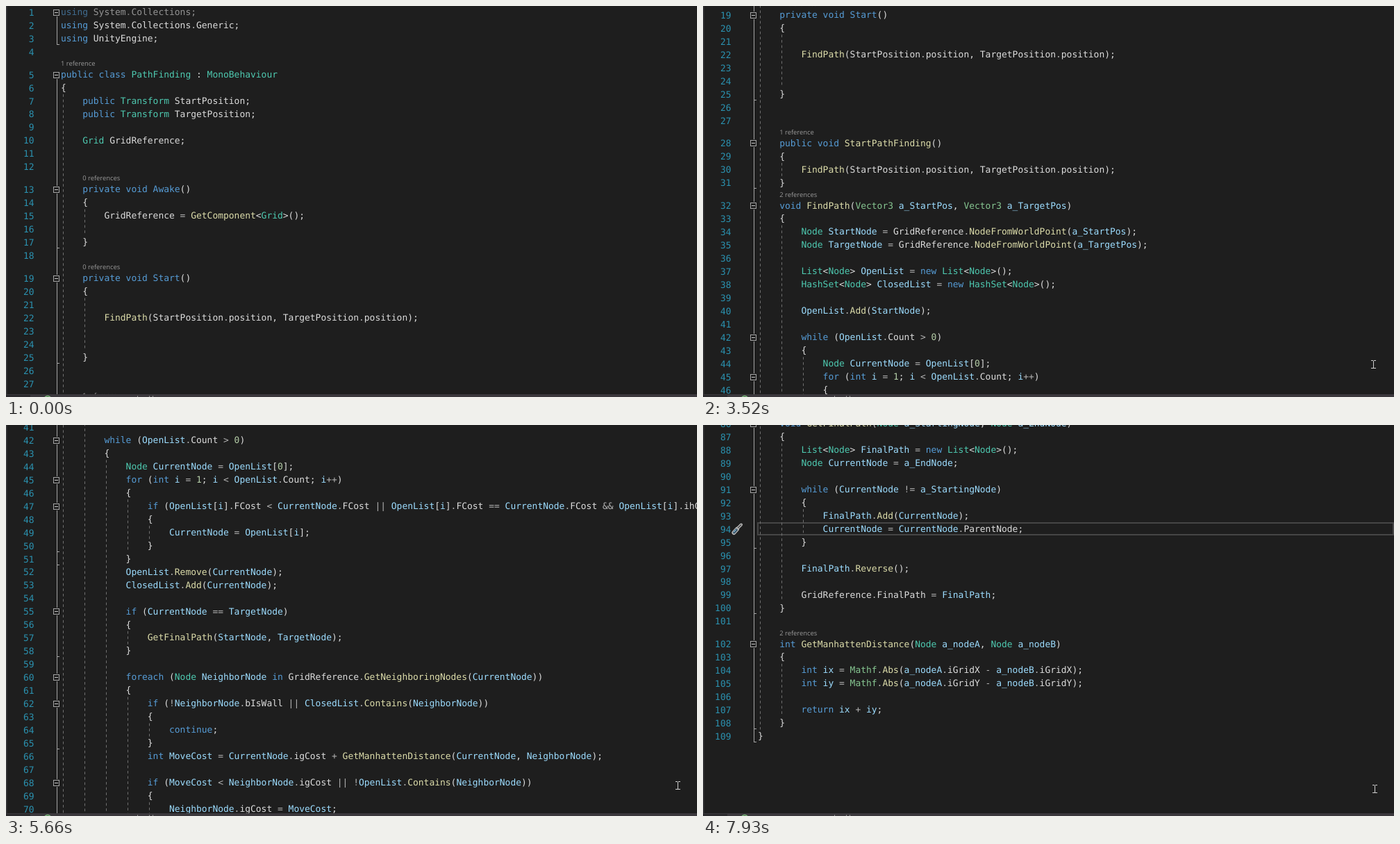
An HTML page with a canvas for the animation above (8 s loop, 995x563 px).

```html
<!DOCTYPE html>
<html lang="en">
<head>
<meta charset="utf-8">
<title>Code scroll</title>
<style>
html, body { margin: 0; width: 100%; height: 100%; overflow: hidden; background: #1e1e1e; }
canvas { display: block; }
</style>
</head>
<body>
<canvas id="stage" width="995" height="563"></canvas>
<script>
const CODE = `using System.Collections;
using System.Collections.Generic;
using UnityEngine;

public class PathFinding : MonoBehaviour
{
    public Transform StartPosition;
    public Transform TargetPosition;

    Grid GridReference;


    private void Awake()
    {
        GridReference = GetComponent<Grid>();

    }

    private void Start()
    {

        FindPath(StartPosition.position, TargetPosition.position);


    }


    public void StartPathFinding()
    {
        FindPath(StartPosition.position, TargetPosition.position);
    }
    void FindPath(Vector3 a_StartPos, Vector3 a_TargetPos)
    {
        Node StartNode = GridReference.NodeFromWorldPoint(a_StartPos);
        Node TargetNode = GridReference.NodeFromWorldPoint(a_TargetPos);

        List<Node> OpenList = new List<Node>();
        HashSet<Node> ClosedList = new HashSet<Node>();

        OpenList.Add(StartNode);

        while (OpenList.Count > 0)
        {
            Node CurrentNode = OpenList[0];
            for (int i = 1; i < OpenList.Count; i++)
            {
                if (OpenList[i].FCost < CurrentNode.FCost || OpenList[i].FCost == CurrentNode.FCost && OpenList[i].ihCost < CurrentNode.ihCost)
                {
                    CurrentNode = OpenList[i];
                }
            }
            OpenList.Remove(CurrentNode);
            ClosedList.Add(CurrentNode);

            if (CurrentNode == TargetNode)
            {
                GetFinalPath(StartNode, TargetNode);
            }

            foreach (Node NeighborNode in GridReference.GetNeighboringNodes(CurrentNode))
            {
                if (!NeighborNode.bIsWall || ClosedList.Contains(NeighborNode))
                {
                    continue;
                }
                int MoveCost = CurrentNode.igCost + GetManhattenDistance(CurrentNode, NeighborNode);

                if (MoveCost < NeighborNode.igCost || !OpenList.Contains(NeighborNode))
                {
                    NeighborNode.igCost = MoveCost;
                    NeighborNode.ihCost = GetManhattenDistance(NeighborNode, TargetNode);
                    NeighborNode.ParentNode = CurrentNode;

                    if (!OpenList.Contains(NeighborNode))
                    {
                        OpenList.Add(NeighborNode);
                    }
                }
            }

        }
    }



    void GetFinalPath(Node a_StartingNode, Node a_EndNode)
    {
        List<Node> FinalPath = new List<Node>();
        Node CurrentNode = a_EndNode;

        while (CurrentNode != a_StartingNode)
        {
            FinalPath.Add(CurrentNode);
            CurrentNode = CurrentNode.ParentNode;
        }

        FinalPath.Reverse();

        GridReference.FinalPath = FinalPath;
    }

    int GetManhattenDistance(Node a_nodeA, Node a_nodeB)
    {
        int ix = Mathf.Abs(a_nodeA.iGridX - a_nodeB.iGridX);
        int iy = Mathf.Abs(a_nodeA.iGridY - a_nodeB.iGridY);

        return ix + iy;
    }
}`;

const W = 995, H = 563, VIEW_H = 559, LOOP = 8000;
const CHAR = 7.8, PITCH = 18.957, LENS = 14, LEFT = 79, TOP = 8.8;
const BG = '#1e1e1e', PLAIN = '#dcdcdc', OPERATOR = '#b4b4b4', OUTLINE = '#a5a5a5';
const CODE_FONT = '12.96px "DejaVu Sans Mono", "Noto Sans Mono", monospace';
const LENS_FONT = '9.4px "Open Sans", "Noto Sans", sans-serif';
const CURRENT_LINE = 94;

// First and last step in ms, and the lines each wheel step scrolls.
const bursts = [
  [180, 360, '000'], [540, 830, '0000'], [1110, 1390, '0002'], [1570, 1760, '222'],
  [2310, 2490, '022'], [2670, 2770, '22'], [2950, 2950, '2'], [3520, 3900, '22222'],
  [4660, 5190, '2222222'], [5660, 5940, '2442'], [6340, 6690, '24422'],
  [7080, 7440, '24444'], [7820, 7930, '22']
];

// Pointer path: ms, x, y
const path = [
  [180, 928, 556], [360, 895, 468], [540, 902, 472], [830, 945, 502], [1390, 963, 509],
  [2310, 963, 512], [3900, 965, 517], [5660, 967, 519], [7080, 967, 524]
];

function pointerAt(t) {
  const i = path.findIndex(p => p[0] >= t);
  if (i < 0) return path.at(-1).slice(1);
  if (i === 0) return path[0].slice(1);
  const [t0, x0, y0] = path[i - 1], [t1, x1, y1] = path[i];
  const k = (t - t0) / (t1 - t0);
  return [Math.round(x0 + (x1 - x0) * k), Math.round(y0 + (y1 - y0) * k)];
}

let scrolled = 0;
const steps = bursts.flatMap(([from, to, wheel]) => [...wheel].map((d, i) => {
  const time = from + (to - from) * i / Math.max(1, wheel.length - 1);
  scrolled += Number(d);
  return { time, scrolled, pointer: pointerAt(time) };
}));

const wordColors = [
  [/^(using|public|private|class|void|new|while|for|foreach|in|if|int|continue|return|Awake|Start)$/, '#569cd6'],
  [/^(Vector3|Mathf)$/, '#86c691'],
  [/^(PathFinding|MonoBehaviour|Transform|Grid|Node|List|HashSet)$/, '#4ec9b0'],
  [/^(System|UnityEngine|StartPosition|TargetPosition|GridReference)$/, PLAIN],
  [/^\d/, '#b5cea8']
];

function colorOf(word, before, after) {
  if (/^\W/.test(word)) {
    const op = /[.=+\-&|!]/.test(word) || (/[<>]/.test(word) && before.endsWith(' '));
    return op ? OPERATOR : PLAIN;
  }
  const known = wordColors.find(([re]) => re.test(word));
  if (known) return known[1];
  if (/^(<\w+>)?\(/.test(after)) return '#dcdcaa';
  return before.endsWith('.') ? PLAIN : '#9cdcfe';
}

function tokenize(text) {
  return [...text.matchAll(/[A-Za-z_]\w*|\d+|[^\s\w]/g)].map(m => ({
    text: m[0],
    x: LEFT + m.index * CHAR,
    color: colorOf(m[0], text.slice(0, m.index), text.slice(m.index + m[0].length))
  }));
}

// Declarations carry a reference count above them.
function lensOf(text) {
  if (!/^ *(public |private )?(class|void|int) \w+( :|\()/.test(text)) return '';
  if (/Awake|Start\(/.test(text)) return '0 references';
  return /FindPath|Distance/.test(text) ? '2 references' : '1 reference';
}

let lensSpace = 0;
const lines = CODE.split('\n').map((text, i) => {
  const lens = lensOf(text);
  if (lens) lensSpace += LENS;
  return { n: i + 1, text, lens, tokens: tokenize(text), indent: text.search(/\S/), y: TOP + i * PITCH + lensSpace };
});
const lineY = n => lines[n - 1].y;

// Brace pairs give both the fold regions and the dashed guides.
const blocks = [], open = [];
for (const { n, text, indent } of lines) {
  if (text.trim() === '{') open.push(n);
  if (text.trim() === '}') blocks.push({ head: open.pop() - 1, end: n, x: LEFT + indent * CHAR + 3 });
}
const folds = [{ head: 1, end: 3 }, ...blocks];

const ctx = document.getElementById('stage').getContext('2d');

function rect(color, x, y, w, h) {
  ctx.fillStyle = color;
  ctx.fillRect(x, y, w, h);
}

function line(color, width, x0, y0, x1, y1) {
  ctx.strokeStyle = color;
  ctx.lineWidth = width;
  ctx.beginPath();
  ctx.moveTo(x0, y0);
  ctx.lineTo(x1, y1);
  ctx.stroke();
}

function drawGuides(shift) {
  ctx.setLineDash([3.8, 3.8]);
  for (const b of blocks) {
    const x = Math.floor(b.x) + 0.5;
    line('#707070', 1, x, lineY(b.head + 1) + 9.5 - shift, x, lineY(b.end) - 9.5 - shift);
  }
  ctx.setLineDash([]);
}

function foldBox(y) {
  const c = Math.round(y);
  rect(BG, 68, c - 5, 10, 11);
  ctx.strokeStyle = OUTLINE;
  ctx.lineWidth = 1;
  ctx.strokeRect(68.5, c - 3.5, 8, 8);
  rect('#c8c8c8', 70, c, 5, 1);
}

function drawFolds(shift) {
  for (const f of folds) {
    const y = lineY(f.head) - shift, bottom = Math.round(lineY(f.end) - shift + 9);
    rect(OUTLINE, 73, Math.round(y), 1, bottom - Math.round(y));
    rect(OUTLINE, 73, bottom - 1, 4, 1);
  }
  for (const f of folds) foldBox(lineY(f.head) - shift);
}

function drawScrewdriver(y) {
  ctx.lineCap = 'round';
  line('#b9b9b9', 6, 44.5, y + 5, 49, y);
  line('#2f4a5c', 3.5, 44.8, y + 4.7, 48.6, y + 0.4);
  line('#7fb2d0', 1.2, 44.5, y + 4, 47.5, y + 0.8);
  line('#b9b9b9', 4, 50, y - 1.5, 55, y - 6.5);
  line('#4a4a4a', 1.4, 50.5, y - 2, 54.8, y - 6.3);
  ctx.lineCap = 'butt';
}

function drawLine(l, shift) {
  const y = l.y - shift;
  if (y < -20 || y > VIEW_H + 30) return;
  if (l.lens) {
    ctx.font = LENS_FONT;
    ctx.fillStyle = '#999999';
    ctx.fillText(l.lens, LEFT + l.indent * CHAR, Math.round(y - 12.8));
  }
  ctx.font = CODE_FONT;
  ctx.fillStyle = '#2b91af';
  ctx.textAlign = 'right';
  ctx.fillText(l.n, 40.5, Math.round(y + 5));
  ctx.textAlign = 'left';
  ctx.globalAlpha = l.n === 1 ? 0.62 : 1;
  for (const t of l.tokens) {
    ctx.fillStyle = t.color;
    ctx.fillText(t.text, t.x, Math.round(y + 4.2));
  }
  ctx.globalAlpha = 1;
}

function drawPanelEdge() {
  rect('#38383b', 0, 0, 1.5, VIEW_H);
  rect('#3b383c', 0, VIEW_H, W, 4);
  rect('#2b2a2d', 0, VIEW_H + 1, 35, 3);
  ctx.strokeStyle = '#7fc27f';
  ctx.lineWidth = 1.4;
  ctx.beginPath();
  ctx.arc(60, 566.5, 5, 0, Math.PI * 2);
  ctx.stroke();
  for (const x of [189, 206, 211]) rect('#a8a8a8', x, 561.5, 1, 1.5);
}

function drawPointer(x, y) {
  const color = '#cfcfcf';
  rect(color, x, y - 5, 1, 11);
  for (const end of [y - 6, y + 5]) {
    rect(color, x - 3, end, 3, 1);
    rect(color, x + 1, end, 3, 1);
  }
}

function draw(t) {
  const step = steps.findLast(s => s.time <= t);
  const shift = step ? step.scrolled * PITCH : 0;
  rect(BG, 0, 0, W, H);
  ctx.save();
  ctx.beginPath();
  ctx.rect(0, 0, W, VIEW_H);
  ctx.clip();
  ctx.textRendering = 'geometricPrecision';
  const current = Math.round(lineY(CURRENT_LINE) - shift);
  ctx.strokeStyle = '#464646';
  ctx.lineWidth = 2;
  ctx.strokeRect(79, current - 9, 915, 17);
  drawGuides(shift);
  drawFolds(shift);
  for (const l of lines) drawLine(l, shift);
  drawScrewdriver(current);
  ctx.restore();
  drawPanelEdge();
  if (step) drawPointer(...step.pointer);
}

const start = performance.now();
function tick() {
  draw((performance.now() - start) % LOOP);
  requestAnimationFrame(tick);
}
tick();
</script>
</body>
</html>
```
